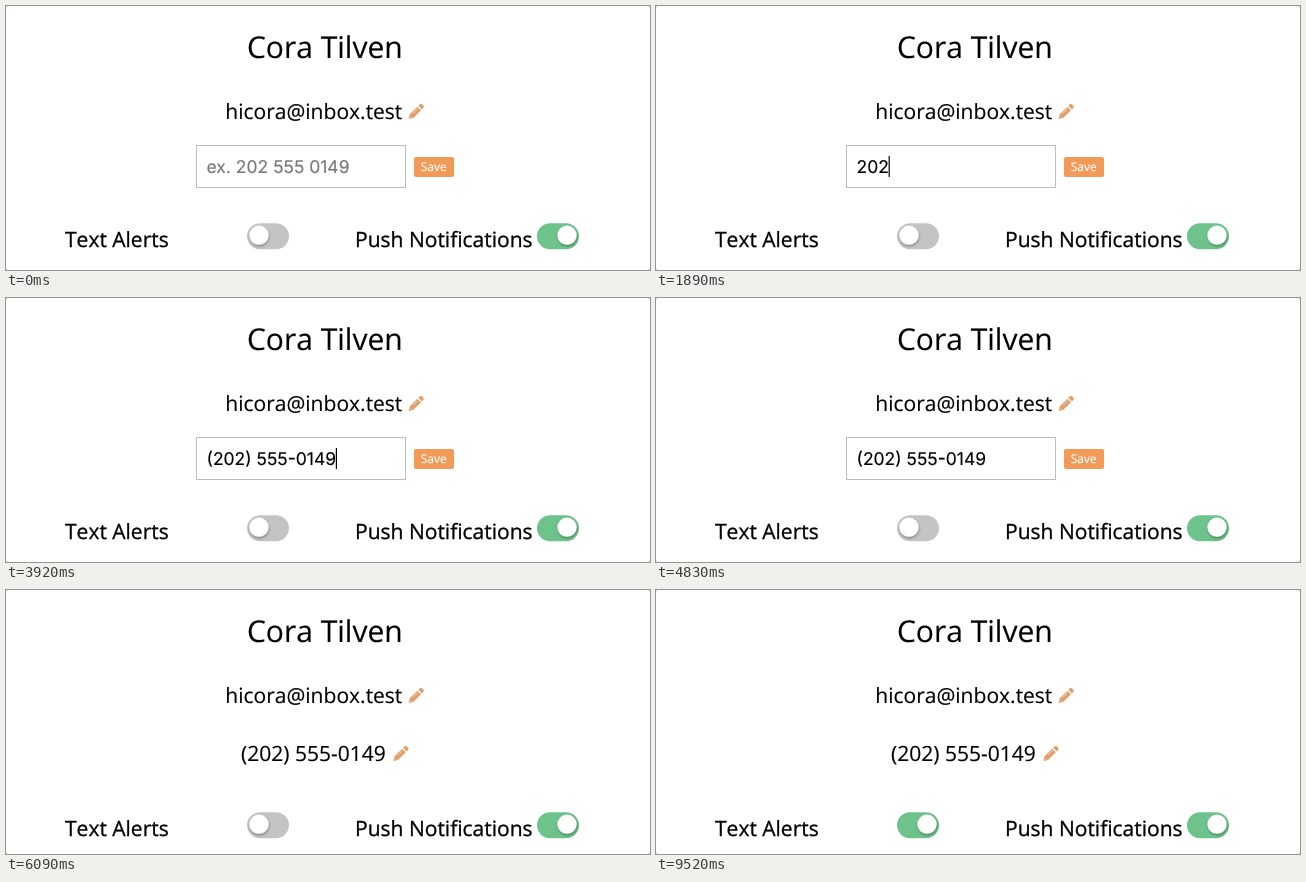
Write an HTML page that moves like this. It is 644 px wide and 264 px high and loops after 9660 ms.

```html
<!DOCTYPE html>
<html lang="en">
<head>
<meta charset="utf-8">
<title>Contact settings</title>
<style>
  html, body { margin: 0; width: 100%; height: 100%; overflow: hidden; background: #fff; }
  svg { display: block; width: 644px; height: 264px; }
  text { font: 21px "Open Sans", sans-serif; font-kerning: none; fill: #000; stroke: #000; stroke-width: .15; text-rendering: geometricPrecision; }
  .title { font-size: 30px; text-anchor: middle; }
  #alerts text { stroke-width: .3; }
  .field text { font: 17.5px Inter, sans-serif; }
  .field .hint { fill: #777; stroke: #777; }
  .save text { font-size: 12px; fill: #fff; stroke: #fff; text-anchor: middle; }
</style>
</head>
<body>
<svg viewBox="0 0 644 264">
  <defs>
    <filter id="soft" x="-50%" y="-50%" width="200%" height="200%">
      <feDropShadow dx="0.5" dy="1.5" stdDeviation="1.3" flood-opacity="0.35"/>
    </filter>
    <filter id="glow"><feGaussianBlur stdDeviation="0.6"/></filter>
    <g id="pencil">
      <path fill="#e0a06c" d="M8.7 3 .9 10.8 0 15.3 4.5 14.4 12.3 6.6ZM9.6 2.1 11.1.6Q12.2-.3 13.3.6L14.7 2Q15.6 3.1 14.7 4.2L13.2 5.7Z"/>
      <path fill="none" stroke="#fff" stroke-width=".8" opacity=".7" d="M4.3 9.6 8.9 5M1.4 12.6 2.7 13.9"/>
    </g>
    <g id="knob">
      <circle r="9.6" fill="#fff" filter="url(#soft)"/>
    </g>
  </defs>

  <rect width="644" height="264" fill="#ccc"/>
  <rect width="644" height="264" rx="3" fill="#fff"/>

  <text class="title" x="318.8" y="52">Cora Tilven</text>
  <text x="219.3" y="113">hicora@inbox.test</text>
  <use href="#pencil" x="402.7" y="97.7"/>

  <g id="editView">
    <g class="field">
      <rect x="190.5" y="139.5" width="209" height="42" fill="#fff" stroke="#bdbdbd"/>
      <text id="hint" class="hint" x="200.5" y="167">ex. 202 555 0149</text>
      <text id="entry" x="200.5" y="167"></text>
      <rect id="caret" y="150" width="1.2" height="21"/>
    </g>
    <g class="save">
      <rect id="ring" x="406" y="149" width="44" height="24" rx="3" fill="none" stroke="#adc6f5" stroke-width="3" filter="url(#glow)"/>
      <rect x="408" y="151" width="40" height="20" rx="2" fill="#f29b58"/>
      <text x="427.8" y="165.2">Save</text>
    </g>
  </g>

  <g id="savedView">
    <text id="phone" x="235" y="171"></text>
    <use href="#pencil" x="387.5" y="155.7"/>
  </g>

  <g id="alerts">
    <text x="59" y="240.5">Text Alerts</text>
    <rect id="track" x="241" y="217.3" width="42" height="26" rx="13"/>
    <use id="textKnob" href="#knob" y="229.2"/>
    <text x="349" y="240.5">Push Notifications</text>
    <rect x="531" y="217.3" width="42" height="26" rx="13" fill="#6ec28c"/>
    <use href="#knob" x="561" y="229.2"/>
  </g>
</svg>
<script>
  const LOOP = 9660, STEP = 70;
  const DIGITS = "2025550149", PHONE = "(202) 555-0149";
  const KEY_TIMES = [1470, 1680, 1890, 2100, 2450, 2730, 3150, 3500, 3710, 3920];
  const SAVED = 5810, TOGGLED = 8190;

  const el = id => document.getElementById(id);
  const between = (t, from, to) => t >= from && t < to;
  const show = (id, on) => el(id).setAttribute("visibility", on ? "inherit" : "hidden");
  const smooth = p => p * p * (3 - 2 * p);

  function render(t) {
    const saved = t >= SAVED, toggled = t >= TOGGLED;
    show("editView", !saved);
    show("savedView", saved);

    const count = KEY_TIMES.filter(k => k <= t).length;
    const entry = el("entry");
    entry.textContent = count === DIGITS.length ? PHONE : DIGITS.slice(0, count);
    show("hint", count === 0);
    show("caret", between(t, 980, 4480) || between(t, 4970, 5110));
    el("caret").setAttribute("x", 200.2 + (count ? entry.getComputedTextLength() : 0));
    show("ring", t >= 5250);
    if (saved) ["hint", "caret", "ring"].forEach(id => show(id, false));

    el("alerts").setAttribute("transform", `translate(0 ${saved ? 5 : 0})`);
    el("track").setAttribute("fill", toggled ? "#6ec28c" : "#c4c4c4");
    const slide = toggled ? smooth(Math.min(1, (t - TOGGLED + 60) / 300)) : 0;
    el("textKnob").setAttribute("x", 253 + 18 * slide);
  }

  el("phone").textContent = PHONE;
  const start = performance.now();
  function tick() {
    const t = (performance.now() - start) % LOOP;
    render(Math.floor(t / STEP) * STEP);
    requestAnimationFrame(tick);
  }
  tick();
</script>
</body>
</html>
```
